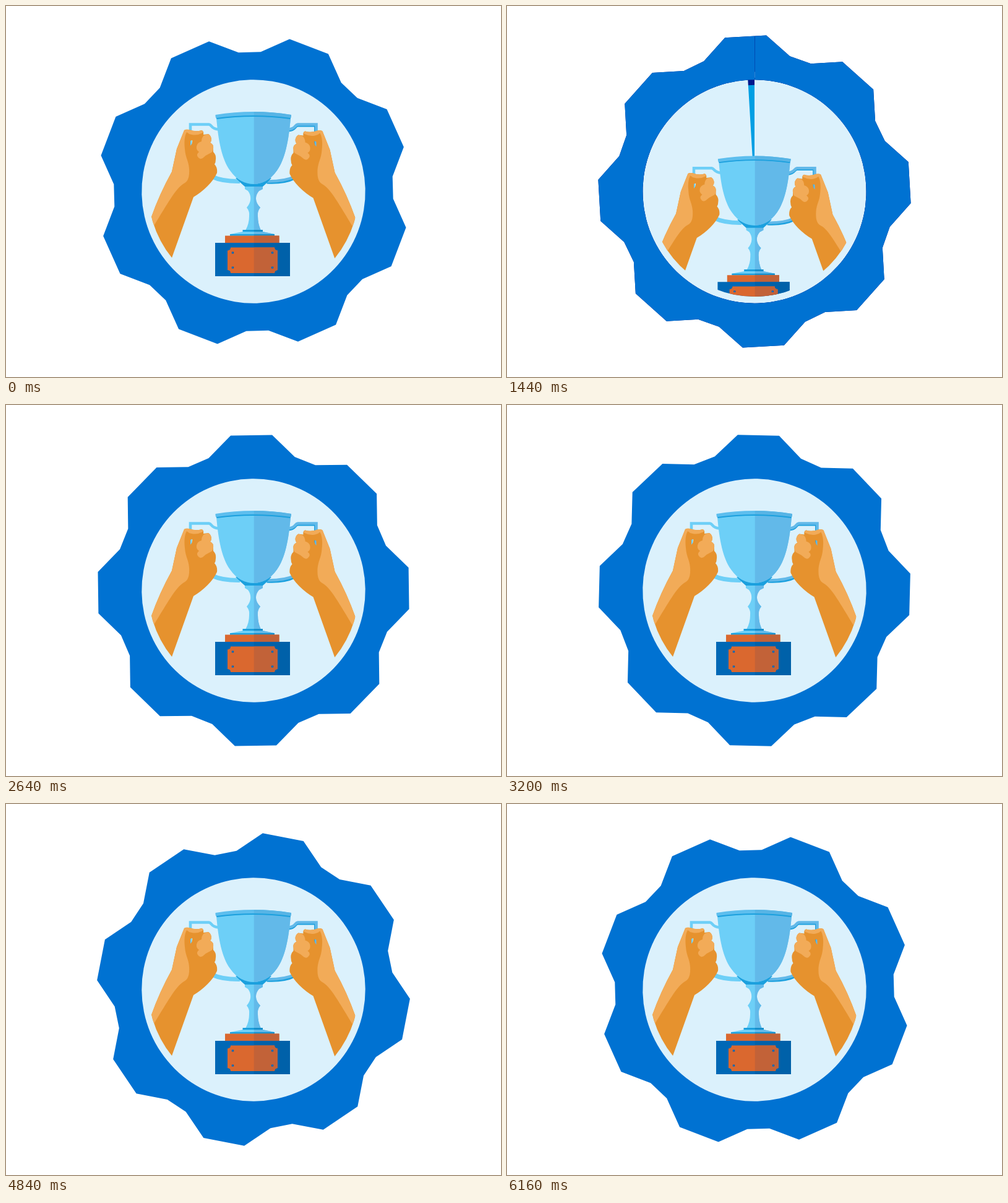
An HTML page with a canvas for the animation above (6.2 s loop, 800 px wide and 600 px high).

```html
<!DOCTYPE html>
<html lang="en">
<head>
<meta charset="utf-8">
<title>Trophy badge</title>
<style>
  html, body { margin: 0; width: 100%; height: 100%; overflow: hidden; background: #fff; }
  canvas { display: block; }
</style>
</head>
<body>
<canvas id="stage" width="800" height="600"></canvas>
<script>
const ctx = document.getElementById('stage').getContext('2d');
const LOOP = 6200, STEP = 40, TAU = Math.PI * 2, TOP = -Math.PI / 2;
const BLUE = '#0072d2', NAVY = '#00178b', CYAN = '#009fe3', PALE = '#dbf1fc';
const SKY = '#6dcff7', SKY_DIM = '#62b9e9', EDGE = '#1ba0de';
const SKIN = '#f2ab58', SKIN_DIM = '#e6922e';
const RUST = '#da682f', RUST_DIM = '#c26238', BASE = '#0068b6', BASE_DIM = '#0061a9';

const clamp = x => Math.min(1, Math.max(0, x));
const mix = (a, b, u) => a + (b - a) * u;
const smooth = u => u * u * (3 - 2 * u);
const cubic = u => u < .5 ? 4 * u ** 3 : 1 - 4 * (1 - u) ** 3;
const wipe = (t, start, length = 880) => cubic(clamp((t - start) / length));

function gearPath() {
  const path = new Path2D();
  for (let tooth = 0; tooth < 8; tooth++) {
    for (const [r, deg] of [[253.3, -7.6], [253.3, 7.6], [226, 17.95], [226, 27.05]]) {
      const a = TOP + (tooth * 45 + deg) * TAU / 360;
      path.lineTo(r * Math.cos(a), r * Math.sin(a));
    }
  }
  path.closePath();
  path.moveTo(180.7, 0);
  path.arc(0, 0, 180.7, 0, TAU);
  return path;
}
const gear = gearPath();

function sector(r, part, dir) {
  ctx.beginPath();
  ctx.moveTo(0, 0);
  ctx.arc(0, 0, r, TOP, TOP + dir * part * TAU, dir < 0);
  ctx.closePath();
}

function pie(color, part) {
  if (!part) return;
  sector(181, part, 1);
  ctx.fillStyle = color;
  ctx.fill();
}

function ring(color, r, width, part, dir) {
  if (!part) return;
  ctx.beginPath();
  ctx.arc(0, 0, r, TOP, TOP + dir * part * TAU, dir < 0);
  ctx.strokeStyle = color;
  ctx.lineWidth = width;
  ctx.stroke();
}

function drawGear(color, part, angle) {
  if (!part) return;
  ctx.save();
  if (part < 1) { sector(300, part, -1); ctx.clip(); }
  ctx.rotate(angle * TAU / 360);
  ctx.fillStyle = color;
  ctx.fill(gear, 'evenodd');
  ctx.restore();
}

const fill = (color, d) => { ctx.fillStyle = color; ctx.fill(new Path2D(d)); };
const line = (color, width, d) => {
  ctx.strokeStyle = color;
  ctx.lineWidth = width;
  ctx.stroke(new Path2D(d));
};

// Fills a shape with one colour left of the trophy's axis and another right of it
function halves(left, right, d) {
  fill(left, d);
  ctx.save();
  ctx.beginPath();
  ctx.rect(400.7, 150, 100, 300);
  ctx.clip();
  fill(right, d);
  ctx.restore();
}

function handle(color, shade) {
  const upper = 'M298 228V191.5H328C333 192 331 199 344 199.5';
  const lower = 'M333 276Q350 284 378 283.5';
  if (shade) {
    line(shade, 4, 'M299.5 228V193.5H328C333 194 331 201 344 201.5');
    line(shade, 6, 'M333 277.5Q350 286 378 284.5');
  }
  line(color, 4.6, upper);
  line(color, shade ? 4.5 : 7, lower);
}

function hand() {
  fill(SKIN_DIM, `M288 201Q290 199 296 200Q307 204 316 201Q320 202 319 208L327 207Q331 209 332 215
    Q332 219 330 221Q336 224 335 230L335 236Q340 241 339 248Q339 253 337 256Q342 261 341 270
    Q336 281 326 291Q315 302 303 309L261 427L215 400L235 341Q248 304 268 268L276 231Z
    M298 218V226Q302 222 301 217Z`);
  fill(SKIN, `M288 201Q290 199 296 200Q307 204 316 201Q319 202 318 205Q309 210 300 208Q295 207 292 204
    Q287 213 289 231C290 246 295 250 296 263C297 281 292 285 286 288C274 296 262 318 238 357
    L225 375L235 341Q248 304 268 268L276 231Z`);
  fill(SKIN, `M320 209L327 207Q331 209 332 215Q332 219 330 221Q336 224 335 230Q335 236 330 238
    Q323 241 318 246Q313 249 310 244Q307 240 312 236Q307 233 308 227Q309 221 316 219
    Q316 213 320 209Z`);
}

function mirrored(draw) {
  ctx.save();
  ctx.translate(799.5, 0);
  ctx.scale(-1, 1);
  draw();
  ctx.restore();
}

function trophy() {
  handle(SKY);
  mirrored(() => handle(SKY_DIM, EDGE));

  halves(SKY, SKY_DIM, `M386 291H415V296L409 299C402 307 402 317 411 326Q406 332 407 340Q407 352 412 363
    H387Q393 352 393 340Q394 332 389 326C397 317 397 307 391 299L386 296Z`);
  fill(EDGE, 'M371 278Q380 287 386 292H415Q421 287 429 278Z');
  halves(SKY, SKY_DIM, `M340 181Q400 172 460 181C457 218 451 248 438 266C427 282 413 288 400 288
    C387 288 373 282 362 266C349 248 343 218 340 181Z`);
  halves('#5dbeee', '#57b4e5', 'M338.5 176Q400 166 461 176Q461 181 459 183Q400 174 341 183Q338 181 338.5 176Z');
  line(EDGE, 1.8, 'M340.5 182Q400 174 459.5 182');

  halves(SKY, SKY_DIM, 'M383 365H415L434 369V372H362V369Z');
  halves(EDGE, '#168fcb', 'M382.5 362H415V365H382.5ZM362 369H434V371.5H362Z');
  halves(RUST, RUST_DIM, 'M354 371.5H441.5V384H354Z');
  halves(BASE, BASE_DIM, 'M338 383H459V437H338Z');
  halves(RUST, RUST_DIM, `M363 390.5H434Q434 395 439 395.5V427Q434 427.5 434 432H363
    Q363 427.5 358 427V395.5Q363 395 363 390.5Z`);
  for (const x of [366.5, 430.5]) {
    for (const y of [399, 423]) fill(BASE, `M${x - 1.7} ${y - 1.5}h3.4v3h-3.4Z`);
  }

  hand();
  mirrored(() => { ctx.translate(0, 1.5); hand(); });
}

function drawTrophy(t) {
  if (t < 920) return;
  const rise = smooth(clamp((t - 900) / 820));
  const settle = smooth(clamp((t - 1720) / 480));
  const drop = mix(mix(300, -20, rise), 0, settle);
  const size = mix(mix(.68, 1.065, rise), 1, settle);
  ctx.save();
  ctx.beginPath();
  ctx.arc(0, 0, 170, 0, TAU);
  ctx.clip();
  ctx.translate(0, drop);
  ctx.scale(size, size);
  ctx.translate(-400, -300);
  trophy();
  ctx.restore();
}

function draw(t) {
  ctx.setTransform(1, 0, 0, 1, 0, 0);
  ctx.fillStyle = '#fff';
  ctx.fillRect(0, 0, 800, 600);
  if (t < STEP) t = LOOP - STEP;
  if (t < 360) return;
  ctx.translate(400, 300);

  const disc = wipe(t, 501, 1083), rim = wipe(t, 566);
  const s = Math.max(0, t / 1000 - 1.2);
  const angle = -3.35 + 1.345 * s * s - .0724 * s ** 3;

  if (disc < 1) {
    const width = mix(17, 9.5, clamp((t - 840) / 600));
    pie(CYAN, wipe(t, 403));
    ring(NAVY, 181.7 - width / 2, width, wipe(t, 472), 1);
  }
  pie(PALE, disc);
  if (rim < 1) {
    drawGear(NAVY, wipe(t, 541), angle);
    ring(PALE, 188.7, 9.5, wipe(t, 332), -1);
  }
  drawGear(BLUE, rim, angle);
  drawTrophy(t);
}

const begin = performance.now();
function tick() {
  const t = (performance.now() - begin) % LOOP;
  draw(Math.floor(t / STEP) * STEP);
  requestAnimationFrame(tick);
}
tick();
</script>
</body>
</html>
```
